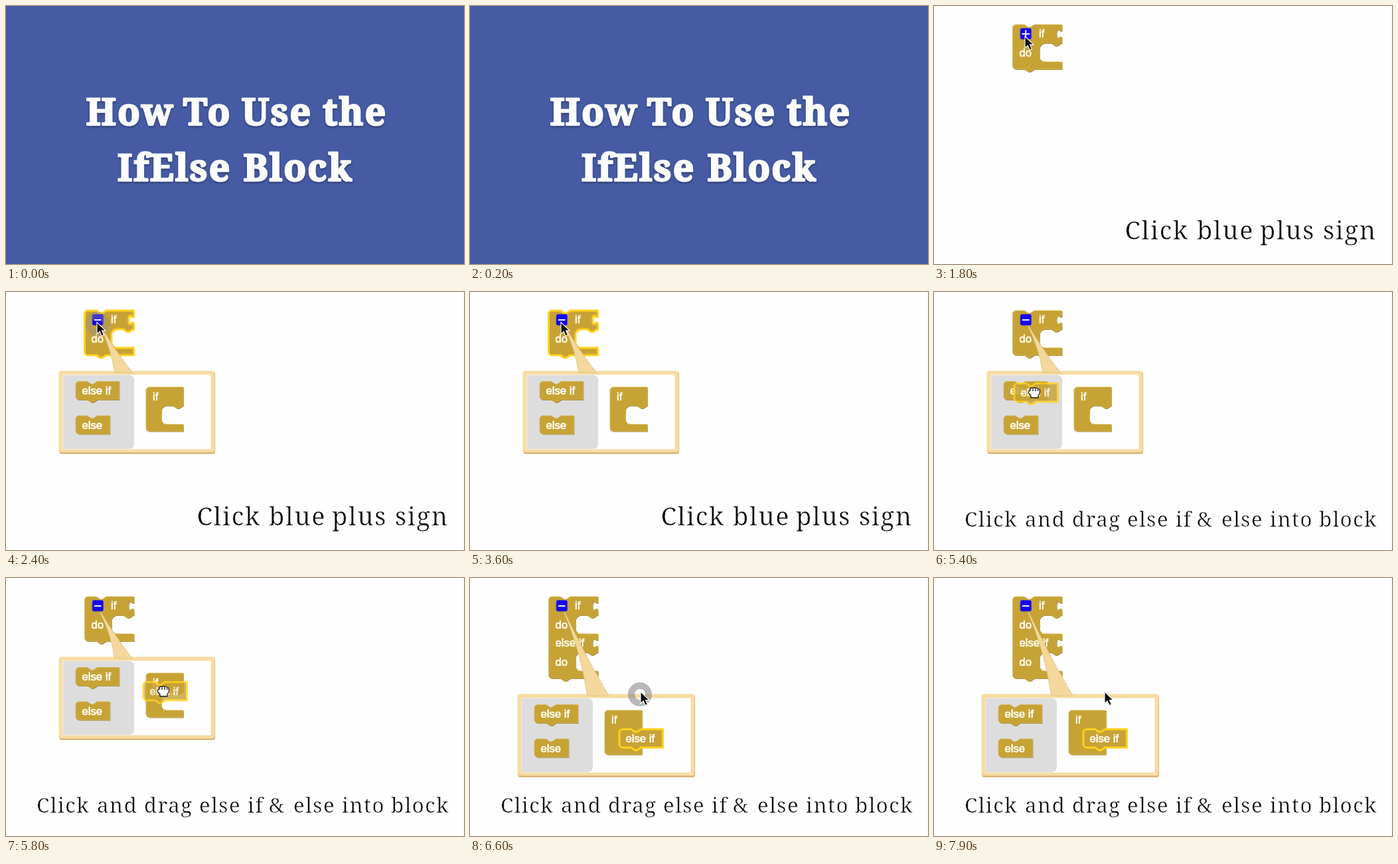
Recreate the animation shown at these times as an HTML page. Size 690 by 388 pixels, loop 8000 ms.

```html
<!DOCTYPE html>
<html lang="en">
<head>
<meta charset="utf-8">
<title>How To Use the IfElse Block</title>
<style>
  html, body { margin: 0; width: 100%; height: 100%; overflow: hidden; background: #fefefe; }
  svg { display: block; width: 100vw; height: 100vh; }
  .title {
    font: bold 55.5px "Noto Serif", "Liberation Serif", serif; letter-spacing: 2px;
    fill: #fdfdfd; stroke: #fdfdfd; stroke-width: 2.4; stroke-linejoin: round;
    filter: drop-shadow(0 2px 1.5px rgba(20, 30, 80, .5));
  }
  .caption {
    font-family: "Noto Serif", "Liberation Serif", serif;
    fill: #0a0a0a; stroke: #fefefe; stroke-width: .6;
  }
  .label {
    font: 16.7px "Liberation Sans", Arial, sans-serif;
    fill: #fffdf4; stroke: #fffdf4; stroke-width: .7;
  }
  .shade { fill: #8f7428; }
  .face { fill: #c7a336; stroke: #d4b657; stroke-width: .8; stroke-linejoin: round; }
  .selected .face { stroke: #ffd11c; stroke-width: 3; }
</style>
</head>
<body>
<svg viewBox="0 0 690 388" preserveAspectRatio="none">
  <g id="work">
    <rect width="690" height="388" fill="#fefefe"/>
    <path d="M688.5 0V388" stroke="#f3f3f3"/>
    <g id="main"></g>
    <g id="mainLong"></g>
    <g id="popup">
      <path id="frameShade" fill="#cfaa63"/>
      <path id="frame" fill="#f6dba2"/>
      <path id="paper" fill="#fefefe"/>
      <path id="tail" fill="#f3d79c" stroke="#dfbd7c" stroke-width=".8"/>
      <g id="parts">
        <path d="M86 125H185Q193 125 193 133V228Q193 236 185 236H86Z" fill="#dddddd"/>
        <g id="elseIf"></g>
        <g id="else"></g>
        <g id="holder"></g>
        <g id="dragged" class="selected"></g>
      </g>
    </g>
    <g id="icon">
      <rect x="130" y="33.5" width="16.5" height="16.5" rx="2.5" fill="#1404ee" stroke="#4740c4"/>
      <path id="sign" stroke="#f2f2ff" stroke-width="2" fill="none"/>
    </g>
    <text class="caption" id="caption1" y="350.7" font-size="38" letter-spacing="1.65"></text>
    <text class="caption" id="caption2" y="353" font-size="31.2" letter-spacing="1.5"></text>
    <circle id="ring" r="13" fill="none" stroke="#8c8c8c" stroke-width="10"/>
    <path id="arrow" d="M0 0V17.5L4.2 13.8L7.2 20.5L10.4 19.2L7.5 12.6H13Z" fill="#080808" stroke="#fff" stroke-width="1.1"/>
    <path id="beam" d="M-4 -10Q0 -10 0 -7Q0 -10 4 -10M0 -7V7M-4 10Q0 10 0 7Q0 10 4 10M-2.5 2H2.5" fill="none" stroke="#1c1c1c" stroke-width="1.5"/>
    <path id="fist" d="M-5 8V5L-8.5 1Q-9 -3 -6 -2.5V-5Q-4.5 -8 -2 -6Q0 -8.5 2 -6Q4.5 -8 5.5 -5Q8.5 -6 8.5 -2V1L6 5V8ZM-2 -5V-2M2 -5V-2M5.5 -4V-2" fill="#fff" stroke="#1a1a1a" stroke-width="1.3" stroke-linejoin="round"/>
  </g>
  <g id="intro">
    <rect width="690" height="388" fill="#465ba3"/>
    <text class="title" id="title1" y="179"></text>
    <text class="title" id="title2" y="263"></text>
  </g>
</svg>
<script>
const LOOP = 8000, STEP = 100;
const $ = id => document.getElementById(id);
const show = (id, on) => $(id).setAttribute('display', on ? 'inline' : 'none');
const move = (id, x, y) => $(id).setAttribute('transform', `translate(${x} ${y})`);

// Sets a line of text with the left edge of each word
function setLine(id, text, starts) {
  $(id).innerHTML = text.split(' ')
    .map((word, i) => `<tspan x="${starts[i]}">${word.replace('&', '&amp;')}</tspan>`).join(' ');
}

setLine('title1', 'How To Use the', [120.5, 267, 355, 477]);
setLine('title2', 'IfElse Block', [168, 357.5]);
setLine('caption1', 'Click blue plus sign', [287.5, 396, 491, 586]);
setLine('caption2', 'Click and drag else if & else into block', [46, 137, 208, 291, 364, 396, 433, 506, 580]);

// Outline pieces, in drawing order clockwise from the top left corner
const topEdge = (x, y, notch) =>
  `M${x} ${y + 5}a5 5 0 0 1 5 -5` + (notch ? `H${x + 17.5}l6 4h3l6 -4` : '');
const bottomEdge = (x, tab) =>
  (tab ? `H${x + 32.5}l-6 4h-3l-6 -4` : '') + `H${x + 5}a5 5 0 0 1 -5 -5Z`;
const socket = y => `V${y + 7}c0 9 -8 -7 -8 7s8 -2 8 7`;
const mouth = (x, right) =>
  `H${x + 32.5}l-6 4h-3l-6 -4H${x + 8}a8 8 0 0 0 -8 8v12a8 8 0 0 0 8 8H${right}`;

function block(id, d, labels) {
  $(id).innerHTML = `<path class="shade" d="${d}" transform="translate(.8 1)"/><path class="face" d="${d}"/>` +
    labels.map(([s, x, y]) => `<text class="label" x="${x}" y="${y}">${s}</text>`).join('');
}

function mainShape(rows) {
  let d = topEdge(118.5, 28, true) + 'H192.7';
  for (let i = 0; i < rows; i++) {
    const y = 28 + 56 * i;
    d += socket(y) + `V${y + 28}` + mouth(159, 192.7);
  }
  return d + `V${28 + 56 * rows + 11}` + bottomEdge(118.5, true);
}

const pill = (y, right, tab) => topEdge(105, y, true) + `H${right}V${y + 27.5}` + bottomEdge(105, tab);
const firstRow = [['if', 158, 47], ['do', 128.5, 76]];

block('main', mainShape(1), firstRow);
block('mainLong', mainShape(2), [...firstRow, ['else if', 128.5, 103], ['do', 128.5, 132]]);
block('elseIf', pill(134.5, 170.5, true), [['else if', 114.5, 154]]);
block('dragged', pill(134.5, 170.5, true), [['else if', 114.5, 154]]);
block('else', pill(186, 156.5, false), [['else', 114.5, 206]]);
block('holder', topEdge(211, 143, false) + 'H267V171' + mouth(234, 267) + 'V209.5' + bottomEdge(211, false),
  [['if', 221, 163]]);

const box = (x, y, w, h, r) =>
  `M${x + r} ${y}h${w - 2 * r}q${r} 0 ${r} ${r}v${h - 2 * r}q0 ${r} ${-r} ${r}h${2 * r - w}q${-r} 0 ${-r} ${-r}v${2 * r - h}q0 ${-r} ${r} ${-r}z`;

function layPopup(grown) {
  const x = grown ? 71.5 : 79.5, y = grown ? 174.5 : 118.5, w = grown ? 267 : 235;
  $('frameShade').setAttribute('d', box(x + .6, y + 1, w, 124, 4));
  $('frame').setAttribute('d', box(x, y, w, 123, 4));
  $('paper').setAttribute('d', box(x + 6, y + 6, w - 12, 112, 1));
  $('tail').setAttribute('d', grown
    ? 'M141 50Q166 108 177 177H209Q171 112 142 50Z'
    : 'M141 50Q158 84 164 121H190Q162 84 142 50Z');
  move('parts', grown ? -8 : 0, grown ? 56 : 0);
}

// Piecewise path through [time, x, y] stops
function along(stops, t) {
  if (t <= stops[0][0]) return stops[0].slice(1);
  for (let i = 1; i < stops.length; i++) {
    const [t0, x0, y0] = stops[i - 1], [t1, x1, y1] = stops[i];
    if (t < t1) {
      const k = (t - t0) / (t1 - t0);
      return [x0 + (x1 - x0) * k, y0 + (y1 - y0) * k];
    }
  }
  return stops[stops.length - 1].slice(1);
}

const APPROACH = [[3800, 137, 45.5], [4100, 140, 78], [4400, 136, 130], [4600, 134, 146]];
const DRAG = [[5300, 0, 0], [5500, 32, 6], [5800, 102, 22], [6100, 118, 25], [6400, 122, 27]];
const CLICKS = [[2200, 600, 137.5, 48], [6600, 400, 256, 175]];

function render(t) {
  const open = t >= 2300, grabbed = t >= 5100, dragging = t >= 5300, dropped = t >= 6600;
  show('intro', t < 1800);
  show('work', t >= 1800);
  show('caption1', !dragging);
  show('caption2', dragging);

  show('main', !dropped);
  show('mainLong', dropped);
  $('main').setAttribute('class', t >= 2200 && !grabbed ? 'selected' : '');
  $('sign').setAttribute('d', open ? 'M133 42H143.5' : 'M132.5 42H144M138.2 36.2V47.8');

  show('popup', open);
  layPopup(dropped);
  const [dx, dy] = along(DRAG, t);
  show('dragged', grabbed);
  $('dragged').setAttribute('opacity', dropped ? 1 : .82);
  move('dragged', dropped ? 128 : dx, dropped ? 37 : dy);

  const beam = t >= 4500 && !grabbed, fist = grabbed && !dropped;
  show('beam', beam);
  show('fist', fist);
  show('arrow', !beam && !fist);
  const [cx, cy] = dropped ? [257, 171] : fist ? [135 + dx, 148 + dy] : along(APPROACH, t);
  for (const id of ['beam', 'fist', 'arrow']) move(id, cx, cy);

  const click = CLICKS.find(([at, span]) => t >= at && t < at + span);
  show('ring', click);
  if (click) {
    const [at, span, x, y] = click;
    move('ring', x, y);
    $('ring').setAttribute('opacity', .6 * (1 - (t - at) / span));
  }
}

function tick(now) {
  render(Math.floor((now % LOOP) / STEP) * STEP);
  requestAnimationFrame(tick);
}
render(0);
requestAnimationFrame(tick);
</script>
</body>
</html>
```
